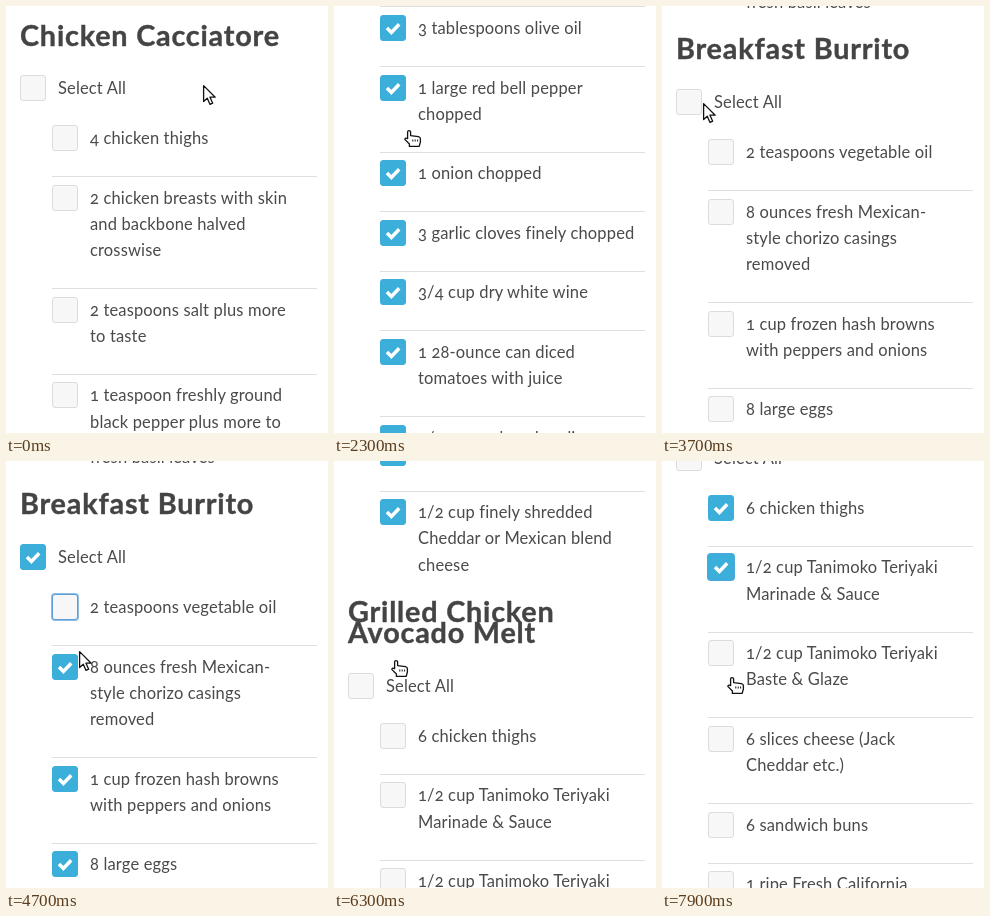
These frames come from a looping animation (322x427 px, 8000 ms). An HTML page:

```html
<!DOCTYPE html>
<html lang="en">
<head>
<meta charset="utf-8">
<title>Shopping list</title>
<style>
  html, body { margin: 0; width: 100%; height: 100%; overflow: hidden; background: #fff; }
  #stage { position: relative; width: 322px; height: 427px; overflow: hidden;
    font: 16.5px/26.1px Lato, sans-serif; letter-spacing: .15px; color: #4a4a4a;
    font-variant-numeric: oldstyle-nums; white-space: nowrap; }
  #page { position: absolute; left: 0; width: 322px; padding-top: 19.5px; }
  section { margin-bottom: 24.4px; }
  h2 { position: relative; top: -1px; margin: 0 0 28.5px 14px; color: #444;
    font-size: 28.8px; line-height: 21px; letter-spacing: .8px; -webkit-text-stroke: .4px #444; }
  .row { position: relative; padding-left: 38px; }
  .all { margin: 0 0 24.3px 14px; }
  .item { margin: 0 0 7.5px 46px; width: 227px; padding-bottom: 25px; border-bottom: 1px solid #dfdfdf; }
  .item:last-child { margin-bottom: 0; padding-bottom: 0; border: 0; }
  .box { position: absolute; left: 0; top: 0; box-sizing: border-box; width: 26px; height: 26px;
    border: 1px solid #dcdcdc; border-radius: 3px; background: #f7f7f7; }
  .box svg { position: absolute; left: -1px; top: -1px; display: none; }
  .focus .box { border-color: #5b9dd9; box-shadow: 0 0 0 1px #5b9dd9aa; }
  .checked .box { border-color: #3bafda; background: #3bafda; }
  .checked.focus .box { box-shadow: 0 0 0 1px #4ba6da; }
  .checked .box svg { display: block; }
  #cursor { position: absolute; left: 0; top: 0; overflow: visible; }
</style>
</head>
<body>
<div id="stage">
  <div id="page"></div>
  <svg id="cursor" width="20" height="22" fill="#fff" stroke="#111" stroke-width="1.3" stroke-linejoin="round">
    <path id="arrow" d="M.6.6V16.6L4.3 13.2 7 19.4 9.7 18.2 7 12.2H12.2Z"/>
    <g id="hand" transform="translate(-5 0)">
      <path d="M3.6 8.6V2.1a1.5 1.5 0 0 1 3 0V5.6L14.4 6.6Q16.4 7 16.4 8.8V12L15.2 16.4H5.4V14L.8 9.4Q1.4 7.4 3.6 8.6Z"/>
      <path d="M8.8 9.5v2M11.2 9.5v2M13.6 9.5v2" stroke-width="1"/>
    </g>
  </svg>
</div>
<script>
const LOOP = 8000, STEP = 100;

// "|" marks a line break
const recipes = [
  ['Chicken Cacciatore',
    '4 chicken thighs',
    '2 chicken breasts with skin|and backbone halved|crosswise',
    '2 teaspoons salt plus more|to taste',
    '1 teaspoon freshly ground|black pepper plus more to|taste',
    '1/2 cup all purpose flour|for dredging',
    '3 tablespoons olive oil',
    '1 large red bell pepper|chopped',
    '1 onion chopped',
    '3 garlic cloves finely chopped',
    '3/4 cup dry white wine',
    '1 28-ounce can diced|tomatoes with juice',
    '3/4 cup reduced-sodium|chicken broth',
    '3 tablespoons drained|capers',
    '1 1/2 teaspoons dried|oregano leaves',
    '1/4 cup coarsely chopped|fresh basil leaves'],
  ['Breakfast Burrito',
    '2 teaspoons vegetable oil',
    '8 ounces fresh Mexican-|style chorizo casings|removed',
    '1 cup frozen hash browns|with peppers and onions',
    '8 large eggs',
    'Kosher salt and freshly|ground black pepper',
    'Hot sauce',
    '4 large burrito-size tortillas',
    '1 avocado sliced',
    '1/2 cup finely shredded|Cheddar or Mexican blend|cheese'],
  ['Grilled Chicken|Avocado Melt',
    '6 chicken thighs',
    '1/2 cup Tanimoko Teriyaki|Marinade &amp; Sauce',
    '1/2 cup Tanimoko Teriyaki|Baste &amp; Glaze',
    '6 slices cheese (Jack|Cheddar etc.)',
    '6 sandwich buns',
    '1 ripe Fresh California|avocado sliced',
    '6 lettuce leaves']
];

// [time, recipe, row, checked]; row 0 is "Select All" and sets the whole recipe
const clicks = [
  [800, 0, 0, true], [4000, 1, 0, true], [4500, 1, 1, false],
  [7000, 2, 1, true], [7400, 2, 2, true]
];

// [time, offset]
const scrollKeys = [
  [0, 0], [1500, 0], [1600, 33], [1700, 110], [1900, 330], [2000, 390], [2100, 390],
  [2200, 450], [2400, 680], [2500, 730], [2600, 730], [2700, 800], [2900, 1074],
  [3000, 1170], [3100, 1230], [3300, 1284], [5200, 1284], [5300, 1317], [5400, 1389],
  [5700, 1618], [5900, 1734], [6000, 1734], [6100, 1784], [6300, 1960], [6400, 2042],
  [6500, 2083], [7700, 2083], [7800, 2116], [7900, 2188], [LOOP, 2188]
];

// [time, x, y, shape]
const cursorKeys = [
  [0, 197, 79, 'arrow'], [300, 118, 83, 'hand'], [600, 37, 88, 'hand'], [900, 37, 88, 'hand'],
  [1100, 50, 100, 'arrow'], [1300, 70, 118, 'hand'], [1400, 75, 124, 'hand'],
  [3300, 75, 124, 'hand'], [3500, 58, 112, 'arrow'], [3800, 32, 90, 'hand'],
  [4200, 32, 90, 'hand'], [4300, 46, 115, 'arrow'], [4400, 58, 148, 'hand'],
  [4500, 60, 150, 'hand'], [4600, 68, 172, 'arrow'], [4700, 73, 190, 'arrow'],
  [4900, 70, 199, 'arrow'], [5000, 62, 199, 'hand'], [6600, 62, 199, 'hand'],
  [6900, 60, 152, 'hand'], [7100, 60, 152, 'hand'], [7300, 59, 200, 'hand'],
  [7500, 59, 200, 'hand'], [7600, 70, 216, 'hand'], [LOOP, 70, 216, 'hand']
];

const byId = id => document.getElementById(id);
const breakLines = text => text.replaceAll('|', '<br>');
const rowHtml = (kind, text) => `<div class="row ${kind}"><span class="box">
  <svg width="26" height="26"><path d="M7 13 11.4 17.4 19.2 9.2" fill="none" stroke="#fff" stroke-width="3.5"/></svg>
  </span>${breakLines(text)}</div>`;

byId('page').innerHTML = recipes.map(([title, ...items]) =>
  `<section><h2>${breakLines(title)}</h2>${rowHtml('all', 'Select All')}` +
  items.map(item => rowHtml('item', item)).join('') + '</section>').join('');

const rows = [...document.querySelectorAll('section')].map(s => [...s.querySelectorAll('.row')]);

function sample(keys, time) {
  const next = keys.findIndex(key => key[0] > time);
  const a = keys[next - 1], b = keys[next];
  const part = (time - a[0]) / (b[0] - a[0]);
  return a.map((v, i) => typeof v === 'number' ? v + (b[i] - v) * part : v);
}

function drawChecks(time) {
  const checked = new Set();
  let focused;
  for (const [at, recipe, row, on] of clicks) {
    if (time < at) break;
    focused = rows[recipe][row];
    for (const el of row ? [focused] : rows[recipe]) on ? checked.add(el) : checked.delete(el);
  }
  for (const el of rows.flat()) {
    el.classList.toggle('checked', checked.has(el));
    el.classList.toggle('focus', el === focused);
  }
}

function draw() {
  const time = Math.floor(performance.now() % LOOP / STEP) * STEP;
  byId('page').style.top = -Math.round(sample(scrollKeys, time)[1]) + 'px';
  drawChecks(time);
  const [, x, y, shape] = sample(cursorKeys, time);
  byId('cursor').style.transform = `translate(${Math.round(x)}px, ${Math.round(y)}px)`;
  for (const id of ['arrow', 'hand']) byId(id).style.display = id === shape ? '' : 'none';
  requestAnimationFrame(draw);
}
draw();
</script>
</body>
</html>
```
